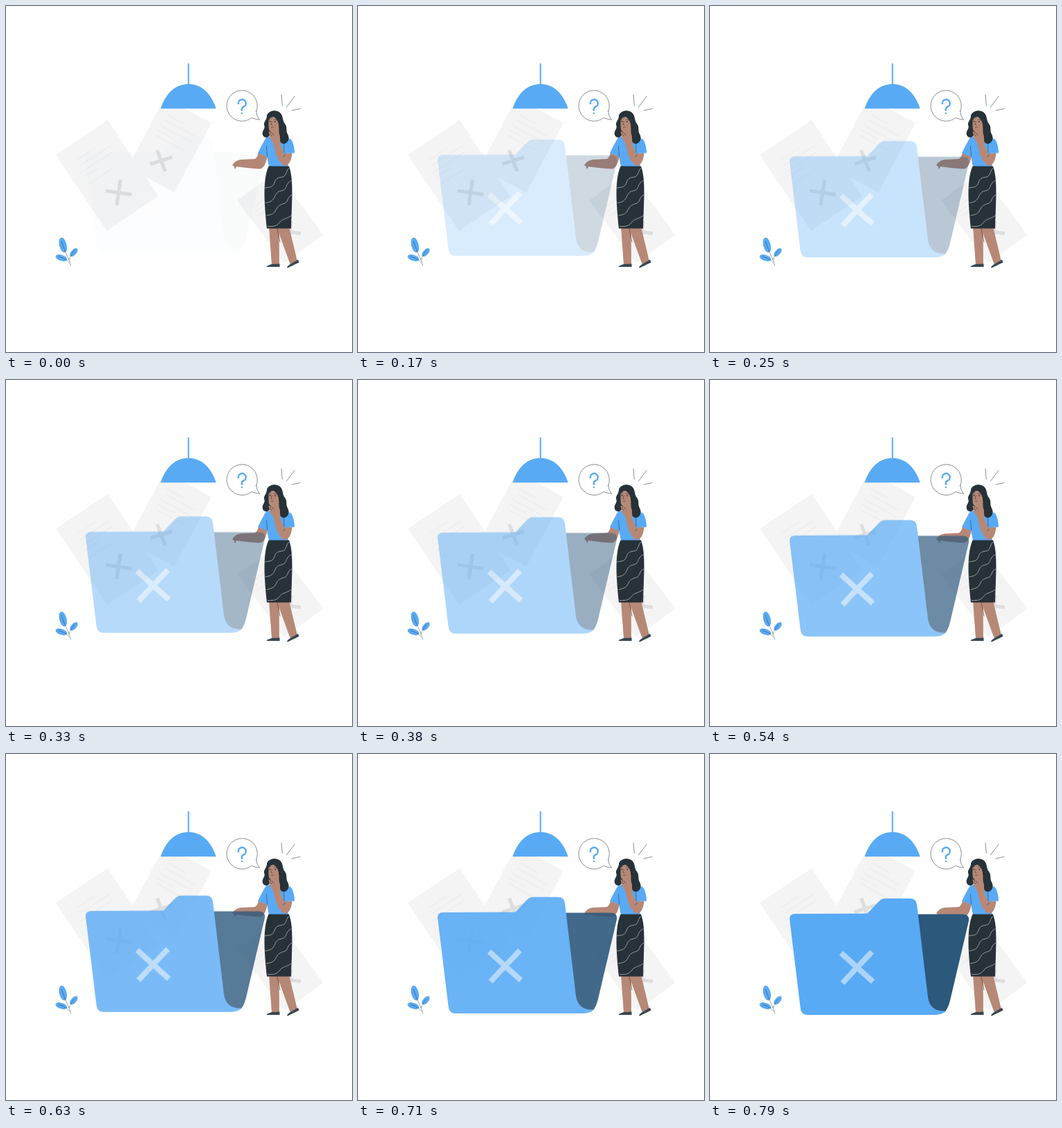
Write an HTML page without scripts that moves like this. It is 500 px wide and 500 px high and loops after 830 ms.

```html
<!DOCTYPE html>
<html lang="en">
<head>
<meta charset="utf-8">
<title>Missing files</title>
<style>
  html, body { margin: 0; width: 100%; height: 100%; overflow: hidden; background: #fff; }
  svg { display: block; width: 100%; height: 100%; }
  .blue { fill: #58aaf5; }
  .skin { fill: #b78876; }
  .dark { fill: #263238; }
  .paper { fill: #f4f4f4; }
  .line { fill: none; stroke: #263238; stroke-width: .55; stroke-linecap: round; stroke-linejoin: round; }
  .text { fill: none; stroke: #e6e6e6; stroke-width: .8; }
  .cross { fill: none; stroke: #dedede; stroke-width: 5.2; }
  .wave { fill: none; stroke: #dfe3e5; stroke-width: .6; }

  /* 24 fps drop with fade-in */
  .folder { animation: drop 830ms steps(20, jump-none) -1.6ms infinite; }
  @keyframes drop {
    from { transform: translateY(-20px); opacity: .02; }
    to { transform: none; opacity: 1; }
  }
</style>
</head>
<body>
<svg viewBox="0 0 500 500">
  <g id="papers">
    <path class="paper" d="M72 215 147 165 220 275 146 325Z"/>
    <path class="text" d="M103 222l26-17M106 231l45-29M106 242l47-30M113 247l20-13M119 258l39-26"/>
    <path class="cross" d="M144 267 181.500 272.500M165.500 251 160 288"/>
    <path class="paper" d="M229.500 132.500 297 169 243 269.500 175.500 233Z"/>
    <path class="text" d="M233 157l27 15M230 165l44 24M222 172l46 25M218 179l24 13M217 187l40 22"/>
    <path class="cross" d="M208.500 228.500 240 218.500M218.500 208.500 230 239"/>
    <path class="paper" d="M334 281 391 240 458.500 330.500 402 371.500Z"/>
    <path class="text" d="M358 290l18-13M359 298l18-13M363 304l18-13"/>
    <path class="cross" d="M396 325 426 328.500M412 311 408 341"/>
  </g>

  <g id="lamp" class="blue">
    <path d="M262.700 83h2v31h-2Z"/>
    <path d="M223.500 148.200C230 127.800 244 112.700 263.600 112.700S297 127.800 303.600 148.200Z"/>
  </g>

  <g id="plant">
    <g class="blue">
      <ellipse cx="82.300" cy="345.500" rx="5.300" ry="11" transform="rotate(-14 82.300 345.500)"/>
      <ellipse cx="98" cy="356" rx="3.900" ry="7.300" transform="rotate(42 98 356)"/>
      <ellipse cx="80" cy="364" rx="8.700" ry="4.300" transform="rotate(18 80 364)"/>
    </g>
    <path class="line" stroke-opacity=".8" d="M80 340Q85 354 89 362 93 370 93.500 375.500M99 354Q92 362 91 367M76 362Q87 365 91 371"/>
  </g>

  <g id="question">
    <path class="line" fill="#fff" d="M361.700 152.500A22.200 22.200 0 1 0 355 161.500Q360 163.500 366.500 164.500 362 159 361.700 152.500Z"/>
    <path fill="none" stroke="#58aaf5" stroke-width="2.500" d="M335.700 142V140.800A5.500 5.500 0 1 1 343.300 145.700Q340.800 146.700 340.800 149V151.800"/>
    <circle class="blue" cx="340.800" cy="155" r="1.300"/>
    <path class="line" d="M398 128.500 399.300 143.500M417 130.500 405.500 146M425 148.500 413 151"/>
  </g>

  <g id="woman">
    <g class="skin">
      <path d="M391 319H409L421 369 411 374Z"/>
      <path d="M380 319H394.500L395 374H384Z"/>
    </g>
    <path class="line" stroke="#8b5b4a" d="M392 322 396 341"/>
    <path fill="#37474f" d="M384 373 395.500 372.500V377H376.500Q376 375.500 384 373ZM411 373 422 366.500 423.500 370.500 407 378.500Q404 377.500 411 373Z"/>

    <path class="skin" d="M365 211 378 215Q376 231 369 235 364 236 333 232L331 236 329.500 232 327 230Q331 223 339 222L360 221Q364 218 365 211Z"/>
    <path class="blue" d="M380 189 399 189Q410 190 413 194 417 203 417 212.500L404 213 406 222 408 232H380L377 217.500 364 212.500Q371 198 376 190Z"/>
    <path class="line" stroke="#2c587c" d="M376.500 203 377.500 217M401.500 199 402 212"/>

    <path class="dark" d="M377 158C380 150 392 149 397 155 401 160 399 165 403 170 407 175 404 180 407 185 411 192 407 200 400 199 394 197 395 190 391 188H380C376 193 369 188 371 182 372 178 375 176 373 172 372 167 377 165 377 158Z"/>
    <path class="skin" d="M379.500 162Q386 155 393 164L394.500 175Q394 184 396 190L389 194 382 190 383 182Q379.500 181 379.500 173Z"/>
    <path class="dark" d="M379 165Q378 155 386 154 396 154 398 166L395 176Q394 165 387 160 382 160 379 165Z"/>
    <path class="line" d="M380.500 163.500l2.300-.5M387.500 164l3 .7M384.300 167l-1.200 4.300 1.500.3M383.500 175.300l3-.4"/>
    <path class="dark" d="M380.800 165.800h1.500v1.700h-1.500ZM388.300 166.400h1.700v1.700h-1.700Z"/>

    <path class="skin" d="M379.500 181 383 183 387 180.500Q394 181 395.500 187L397 202 403 215 404 213 413.500 212.500Q412 228 404 231 396 230 390 214L386 198 381 190Z"/>
    <path class="line" stroke="#8b5b4a" d="M381 184l3 4M384 183l3 4M403 215l-2 3"/>

    <path class="dark" d="M379.500 231.500H409C415 249 414 268 412 321.500H377C374 291 370 253 379.500 231.500Z"/>
    <path class="wave" d="M373.500 263C382 261 385 263 388 255S395 248 400 247 405 237 409 234M374.500 284.500C384 283 386 281 389 274S396 268 401 266 404 255 413.500 252M376 303C386 301 388 299 391 293S398 287 403 285 406 276 413 273M378 318.500C390 319 392 317 396 312S405 308 412 303"/>
  </g>

  <g id="folder" class="folder">
    <path fill="#2c587c" d="M290 231.500H366Q375.500 232 374 241L347 356Q343.500 370 338.500 373H318Z"/>
    <path class="blue" d="M115.200 240Q114 231.200 123 231L227.500 230.500 243 214Q248 208.800 253 208.800H289Q298 208.800 299 218L315 352Q318.500 373 341 371.500 335 377 323 377H141Q132 377 130.800 368Z"/>
    <path fill="none" stroke="#fff" stroke-opacity=".5" stroke-width="8" d="M189.500 287.500 212.500 308.500 235.500 329M234 286 212.500 308.500 191.500 331"/>
  </g>
</svg>
</body>
</html>
```
